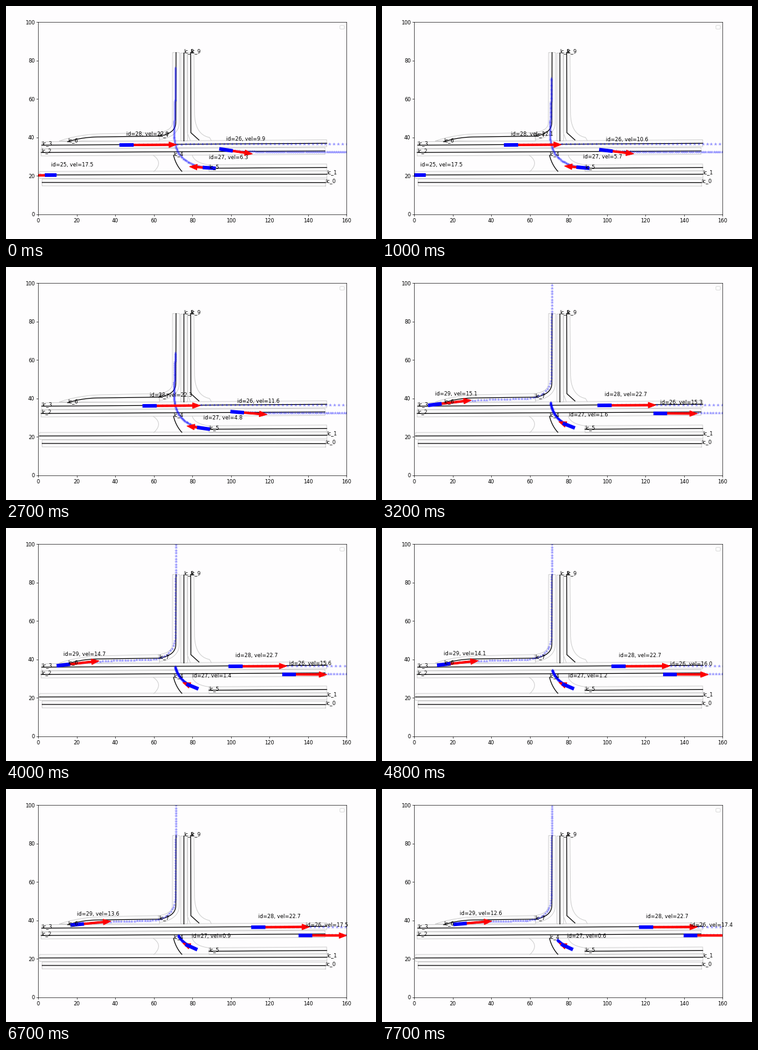
Write a matplotlib script that moves like this. It is 600 px wide and 379 px high and loops after 7.8 s.

```python
import numpy as np
import matplotlib.pyplot as plt
from matplotlib.animation import FuncAnimation

W, H, DPI = 600, 379, 60
FRAMES, INTERVAL = 78, 100
PAPER = "#fefdfe"

plt.rcParams["font.family"] = "DejaVu Sans"
fig = plt.figure(figsize=(10, 6.3167), dpi=DPI, facecolor=PAPER)
ax = fig.add_axes([52.4 / W, 40.1 / H, 499.8 / W, 312.5 / H], facecolor=PAPER)
ax.set_xlim(0, 160)
ax.set_ylim(0, 100)
ax.legend([], [], loc="upper right")


def bend(a, corner, b, n=16):
    """Quadratic curve from a to b, pulled towards the corner."""
    t = np.linspace(0, 1, n)[:, None]
    a, corner, b = map(np.array, (a, corner, b))
    return [*((1 - t) ** 2 * a + 2 * t * (1 - t) * corner + t ** 2 * b)]


def outline(pts, half=1.8):
    """Closed border at a fixed distance on both sides of a lane."""
    pts = np.array(pts, float)
    d = np.gradient(pts, axis=0)
    d /= np.hypot(*d.T)[:, None]
    side = half * np.column_stack([-d[:, 1], d[:, 0]])
    return [*(pts + side), *(pts - side)[::-1], pts[0] + side[0]]


def stroke(pts, **style):
    ax.plot(*np.array(pts).T, **style)


# Each lane is labelled at its first point
LANES = [
    [(149.1, 16.5), (2, 16.6)],
    [(149.8, 20.9), (0.6, 20.5)],
    [(1.5, 32.2), (148.8, 33)],
    [(1.8, 36), (149.7, 37)],
    bend((70.2, 30.7), (71.4, 25.8), (74.5, 22.4)),
    [(88.6, 24), (149.7, 24.4)],
    bend((15.2, 37.8), (23, 40.3), (32, 40.3)) + [(62.6, 40.7)],
    bend((62.6, 40.7), (71.4, 42), (71.4, 48)) + [(71.5, 84.2)],
    [(75.5, 84.2), (75.5, 38.5)],
    [(79.1, 84.2), (79.2, 42.5), (83.4, 38.7)],
]

BORDERS = [outline(LANES[n]) for n in (0, 1, 2, 3, 5, 7, 8)] + [
    bend((11, 38.2), (22, 42), (36, 42)) + [(62.9, 42.6), (62.9, 38.1), (11, 38.2)],
    [(78.9, 38.4), (77.4, 42.3), (77.3, 84.2), (80.8, 84.2)]
    + bend((81.1, 52), (81.5, 41.5), (88.9, 40)) + [(89.8, 38.4)],
    bend((79.9, 30.9), (81, 26.8), (88.5, 25.8)),
    bend((59.7, 30.7), (65, 27), (60, 22.3)),
]

for pts in BORDERS:
    stroke(pts, color="#cacaca", lw=1.1)
for n, pts in enumerate(LANES):
    stroke(pts, color="black", lw=1.5)
    ax.text(*pts[0], f"lc_{n}")


def clock(i):
    """Simulated seconds at frame i: steady steps, two skips, one held step."""
    return 0.02 * i + 1.72 * (i >= 31) - 0.02 * (i >= 59) + 0.07 * (i >= 76)


HORIZON = np.arange(0, 10.01, 0.1)


class Vehicle:
    """Follows a path; distance is the integral of speed over (time, speed) keys."""

    def __init__(self, vid, half, path, start, speeds, first=0, last=FRAMES):
        self.vid, self.half, self.start = vid, half, start
        self.first, self.last = first, last
        self.path = np.array(path, float)
        steps = np.hypot(*np.diff(self.path, axis=0).T)
        self.arc = np.concatenate([[0], np.cumsum(steps)])
        self.keys = np.array(speeds, float).T
        self.stars, = ax.plot([], [], "*", color="blue", ms=7, mew=0,
                              alpha=0.4, zorder=2.1)
        self.arrow = ax.arrow(0, 0, 1, 0, width=1, head_width=3,
                              head_length=4, color="red", zorder=2.2)
        self.body, = ax.plot([], [], color="blue", lw=7,
                             solid_capstyle="butt", zorder=2.3)
        self.label = ax.text(0, 0, "")
        self.artists = [self.stars, self.arrow, self.body, self.label]

    def speed(self, t):
        return np.interp(t, *self.keys)

    def at(self, s):
        """Point on the path at arc length s, with corners rounded."""
        s = np.add.outer(np.linspace(-2, 2, 5), s)
        return [np.interp(s, self.arc, c).mean(axis=0) for c in self.path.T]

    def update(self, i):
        shown = self.first <= i < self.last
        for artist in self.artists:
            artist.set_visible(shown)
        if not shown:
            return
        t = clock(i)
        v = self.speed(t)
        s = self.start + t * self.speed(np.linspace(0, t, 300)).mean()
        x, y = self.at(s)
        (x0, x1), (y0, y1) = self.at(np.array([s - 1.5, s + 1.5]))
        ang = np.arctan2(y1 - y0, x1 - x0)
        ux, uy = np.cos(ang), np.sin(ang)
        h = self.half
        self.stars.set_data(*self.at(s + v * HORIZON))
        self.arrow.set_data(x=x, y=y, dx=v * ux, dy=v * uy)
        self.body.set_data([x - h * ux, x + h * ux], [y - h * uy, y + h * uy])
        self.label.set_position((x, y + 4.7))
        self.label.set_text(f"id={self.vid}, vel={v:.1f}")


xs = np.arange(91, 400)
merge = np.column_stack([xs, 32.2 + 1.3 * np.exp((97.7 - xs) / 8.9)])
through = [(28, 36), (120, 36.55), (400, 36.55)]
turn_in = ([(100, 23.9)] + bend((90, 24.1), (69.6, 24.6), (70.6, 43))
           + [(71.2, 62), (71.2, 110)])
turn_up = (bend((1, 35.6), (26, 39.1), (44, 39.3))
           + bend((58, 39.7), (71, 40.2), (71.3, 52)) + [(71.6, 130)])

VEHICLES = [
    Vehicle(25, 3.1, [(20, 20.3), (-400, 20.3)], 13.5, [(0, 17.5)], last=16),
    Vehicle(26, 3.55, merge, 6.6,
            [(0, 9.9), (0.4, 11.3), (2.36, 15.3), (2.84, 16.3), (3.04, 17.5),
             (3.31, 17.4)]),
    Vehicle(27, 3.4, turn_in, 11.3,
            [(0, 6.3), (0.4, 5), (2.36, 1.6), (2.84, 1), (3.04, 0.9),
             (3.31, 0.6)]),
    Vehicle(28, 3.7, through, 17.8, [(0, 22), (0.4, 22.3), (2.36, 22.7)]),
    Vehicle(29, 3.55, turn_up, -25.9,
            [(2.36, 15.1), (2.52, 14.7), (2.84, 13.4), (3.04, 13.6),
             (3.31, 12.6)], first=31),
]


def draw(i):
    for car in VEHICLES:
        car.update(i)
    return [a for car in VEHICLES for a in car.artists]


anim = FuncAnimation(fig, draw, frames=FRAMES, interval=INTERVAL,
                     init_func=lambda: draw(0), repeat=True, repeat_delay=0)
plt.show()
```
